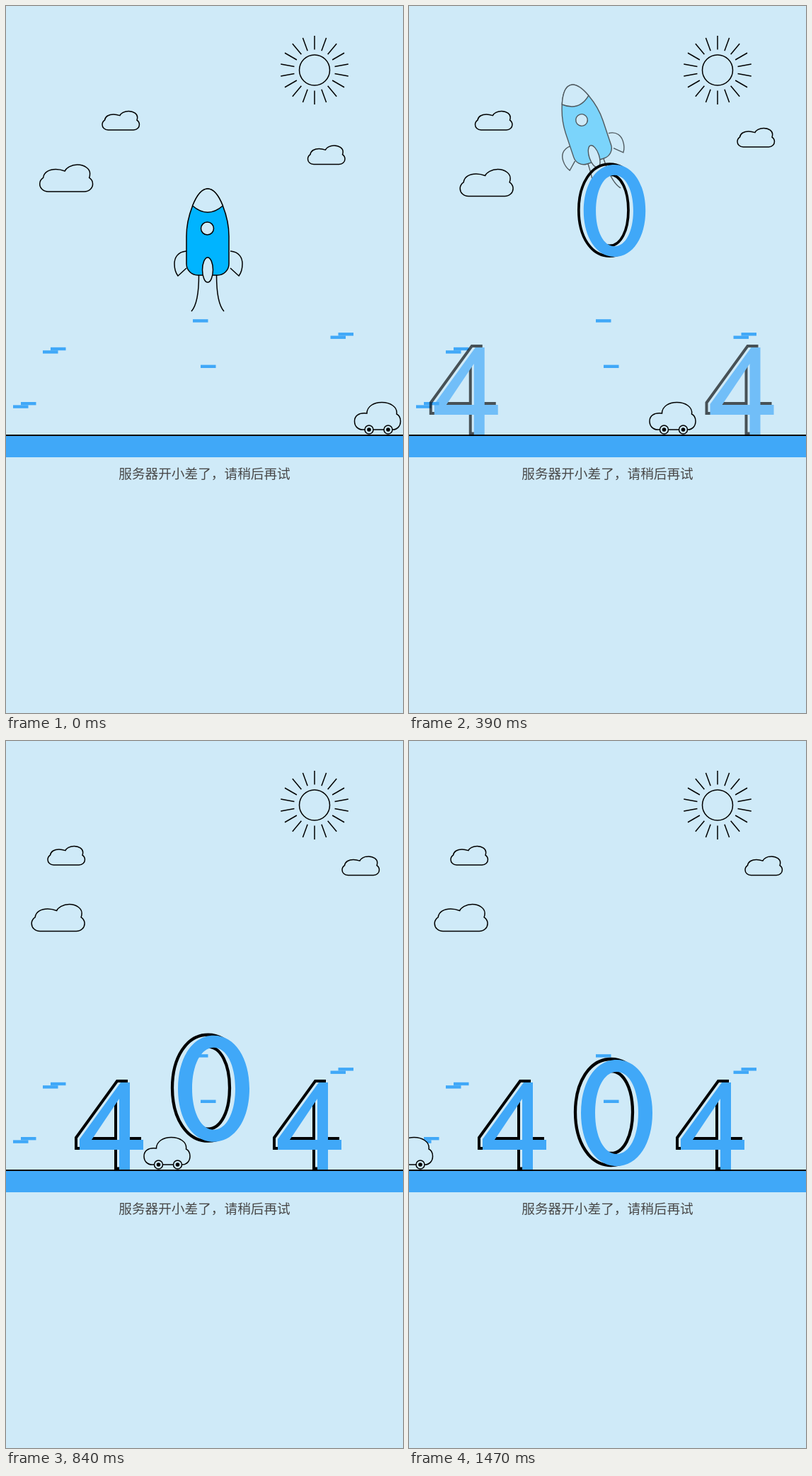
An HTML page that plays this animation: 561 px wide and 998 px high, repeating every 1.5 s.

```html
<!DOCTYPE html>
<html lang="zh-CN">
<head>
<meta charset="utf-8">
<title>404</title>
<style>
  html, body { margin: 0; width: 100%; height: 100%; overflow: hidden; background: #cfeaf8; }
  svg { display: block; width: 561px; height: 998px; }
  .line { fill: none; stroke: #000; stroke-width: 1.5; }
  .sky { fill: #cfeaf8; }
  .blue { fill: #40a8f8; }
  text { font: 18.67px "Noto Sans CJK SC", "Noto Sans CJK", sans-serif; fill: #484848; text-anchor: middle; }
</style>
</head>
<body>
<svg viewBox="0 0 561 998">
  <defs>
    <path id="cloud" vector-effect="non-scaling-stroke" d="M12 0C5 0 0-5 0-11C0-15 2-18 5-20C6-28 14-32 23-32C28-32 32-31 36-29.5C38-34 45-38.5 54-38.5C65-38.5 72-32 72-26C72-24 71.8-22 71-20C74-18 76-15 76-11C76-5 71 0 64 0Z"/>
    <path id="four" d="M162 482H175V563H194V577H175V605.5H160V577H104V562ZM160 563V505L121 563Z"/>
    <path id="fin" d="M255 346C242 347 238 356 238 364C238 371 240 377 243 381L255 370"/>
    <path id="trail" d="M272.5 380C272.5 400 270 422 262 431"/>
    <path id="zero" fill-rule="evenodd"/>
  </defs>
  <rect class="sky" width="561" height="998"/>
  <g id="dashes" class="blue"></g>
  <g id="sun" class="line" transform="translate(436 90.5)"><circle r="21.5"/></g>
  <g class="line">
    <use id="cloudA" href="#cloud"/>
    <use id="cloudB" href="#cloud"/>
    <use id="cloudC" href="#cloud"/>
  </g>
  <g id="rocket" class="line">
    <g transform="translate(-284.5 -314)">
      <use href="#trail"/>
      <use href="#trail" transform="translate(570) scale(-1 1)"/>
      <use href="#fin"/>
      <use href="#fin" transform="translate(572) scale(-1 1)"/>
      <path id="hull" fill="#00b4ff" d="M285 258C268 258 255 300 255 325V364A16 16 0 0 0 271 380H299A16 16 0 0 0 315 364V325C315 300 302 258 285 258Z"/>
      <path class="sky" d="M285 258C276.5 258 269 268.5 263.6 282Q285 300.5 306.4 282C301 268.5 293.5 258 285 258Z"/>
      <circle class="sky" cx="284.5" cy="314" r="9"/>
      <ellipse class="sky" cx="285" cy="372.5" rx="7.5" ry="17.5"/>
    </g>
  </g>
  <g id="car" class="line">
    <path class="sky" d="M504 598C497 598 492.5 593 492.5 586C492.5 579 498 573.5 510 575C510 565 520 559.5 531 559.5C543 559.5 553.5 566 552 576C556 578 557.5 582 557.5 586C557.5 593 553 598 546.5 598Z"/>
    <g class="sky"><circle cx="513" cy="598" r="6"/><circle cx="540" cy="598" r="6"/></g>
    <g fill="#000" stroke="none"><circle cx="513" cy="598" r="2.8"/><circle cx="540" cy="598" r="2.8"/></g>
  </g>
  <g id="left"><use href="#four" class="line" style="stroke-width:4" x="-5" y="-2"/><use href="#four" class="face"/></g>
  <g id="right"><use href="#four" class="line" style="stroke-width:4" x="-5" y="-2"/><use href="#four" class="face"/></g>
  <g id="drop"><use href="#zero" class="line" style="stroke-width:4.3" x="-8" y="-1"/><use href="#zero" class="blue"/></g>
  <rect class="blue" y="607" width="561" height="30"/>
  <rect y="605" width="561" height="2"/>
  <text x="280.5" y="667.3">服务器开小差了，请稍后再试</text>
</svg>
<script>
const $ = id => document.getElementById(id);
const SKY = '#cfeaf8', BLUE = '#40a8f8', LOOP = 1500, STEP = 30;

function add(parent, tag, attrs) {
  const el = document.createElementNS('http://www.w3.org/2000/svg', tag);
  for (const k in attrs) el.setAttribute(k, attrs[k]);
  parent.append(el);
}

const dash = (x, y) => add($('dashes'), 'rect', { x, y, width: 21.5, height: 4.4 });
dash(264, 442.2);
dash(275, 506.6);
for (const [x, y] of [[52, 486.2], [10, 563.4], [458.5, 465.5]]) {
  dash(x, y);
  dash(x + 11, y - 4.4);
}

for (let i = 0; i < 18; i++)
  add($('sun'), 'path', { d: 'M0-29V-48.5', transform: `rotate(${i * 20})` });

const oval = (a, b) => {
  const h = a * .6, v = b * .57;
  return `M22.5 ${-b}c${h} 0 ${a} ${b - v} ${a} ${b}s${h - a} ${b} ${-a} ${b}` +
         `s${-a} ${v - b} ${-a} ${-b}s${a - h} ${-b} ${a} ${-b}Z`;
};
$('zero').setAttribute('d', oval(50.5, 75) + oval(30.5, 58));

// Smooth curve through values at the given times, held at both ends
function track(times, values) {
  const slope = i => (values[i + 1] - values[i]) / (times[i + 1] - times[i]);
  const last = times.length - 1;
  const tangent = i => {
    if (i === 0) return slope(0);
    if (i === last) return slope(last - 1);
    const a = times[i] - times[i - 1], b = times[i + 1] - times[i];
    return (slope(i - 1) * b + slope(i) * a) / (a + b);
  };
  return t => {
    if (t <= times[0]) return values[0];
    if (t >= times[last]) return values[last];
    const i = times.findIndex(x => x > t) - 1;
    const d = times[i + 1] - times[i], u = (t - times[i]) / d, w = 1 - u;
    return w * w * (1 + 2 * u) * values[i] + u * u * (3 - 2 * u) * values[i + 1] +
           d * u * w * (w * tangent(i) - u * tangent(i + 1));
  };
}

const entry = [0, 240, 390, 540, 600];
const enter = (...values) => track(entry, values);
const carX = track([0, 240, 390, 540, 840, 1080, 1470], [0, -98, -152.5, -202, -297.5, -361, -524]);
const ax = enter(0, -22.5, -42.5, -67.5, -77);
const bx = enter(0, 30.5, 24.5, 2, -11.5), by = enter(0, 5, 6.5, 6.5, 6.5);
const cx = enter(0, 26, 37.5, 46, 48.5), cy = enter(0, -16, -24.5, -31, -34);
const rocketX = enter(0, -17, -40.5, -71.5, -85), rocketY = enter(0, -106, -153, -185, -195);
const rocketTurn = enter(0, -11.8, -18.5, -25.7, -28.5), rocketSize = enter(1, .993, .927, .79, .72);
const rocketAlpha = enter(1, .75, .62, .4, 0), hullAlpha = enter(1, .8, .65, 0, 0);
const rightX = enter(175, 89, 41.5, 11.5, 0);
const fall = enter(-93, 132, 289, 460, 525), grow = enter(.8, .824, .866, .957, 1);

function zeroY(t) {
  if (t < 600) return fall(t);
  const q = Math.PI / 2;
  if (t < 1080) return 525 - 48.5 * Math.sin((t - 600) / 480 * q);
  return 525 - 48.5 * Math.cos(Math.min(1, (t - 1080) / 390) * q);
}

const move = (id, x, y, rest = '') => $(id).setAttribute('transform', `translate(${x} ${y}) ${rest}`);

function draw(t) {
  move('car', carX(t), 0);
  move('cloudA', 136 + ax(t), 175, 'scale(.69)');
  move('cloudB', 47.7 + bx(t), 262 + by(t), 'scale(.985)');
  move('cloudC', 426.5 + cx(t), 223.5 + cy(t), 'scale(.69)');

  move('rocket', 284.5 + rocketX(t), 314 + rocketY(t), `rotate(${rocketTurn(t)}) scale(${rocketSize(t)})`);
  $('rocket').style.opacity = Math.max(0, rocketAlpha(t));
  $('hull').style.fillOpacity = Math.max(0, hullAlpha(t));

  const u = Math.min(1, t / 600);
  move('left', -195 * (1 - u), 0);
  move('right', 280 + rightX(t), 0);
  for (const id of ['left', 'right']) {
    $(id).style.opacity = u;
    $(id).querySelector('.face').style.fill = u < .5 ? SKY : BLUE;
  }
  move('drop', 271, zeroY(t), `scale(${grow(t)})`);
}

const start = performance.now();
function tick() {
  const t = (performance.now() - start) % LOOP;
  draw(Math.floor(t / STEP) * STEP);
  requestAnimationFrame(tick);
}
tick();
</script>
</body>
</html>
```
